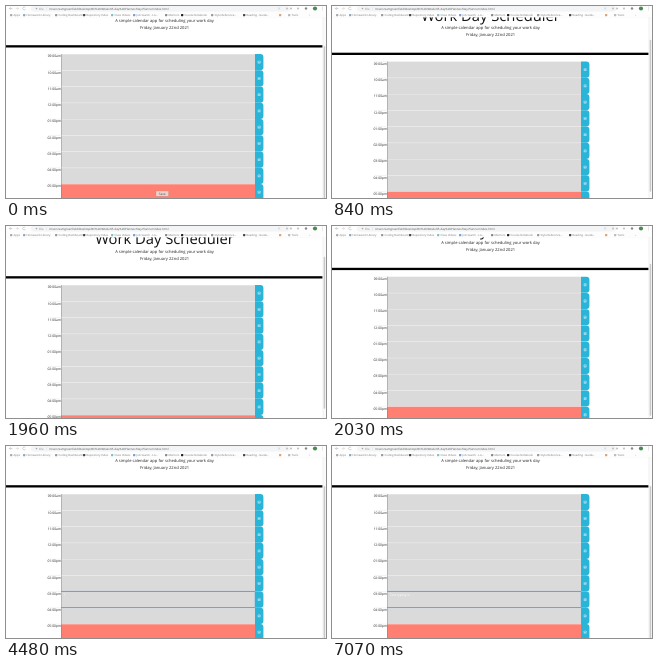
An HTML page for the animation above (8 s loop, 320x192 px).

```html
<!DOCTYPE html>
<html lang="en">
<head>
<meta charset="utf-8">
<title>Work Day Scheduler</title>
<style>
  html, body { margin: 0; width: 100%; height: 100%; overflow: hidden; background: #fff; }
  svg { display: block; width: 320px; height: 192px; }
  text { font-family: "Open Sans", Arial, sans-serif; text-rendering: geometricPrecision; white-space: pre; }
  .mid { text-anchor: middle; }
  .end { text-anchor: end; }
</style>
</head>
<body>
<svg id="stage" viewBox="0 0 320 192">
  <rect width="320" height="192" fill="#fff"/>
  <g id="page"></g>
  <rect x="316.8" y="11" width="3.2" height="181" fill="#fafafa"/>
  <rect x="316.8" y="11" width=".4" height="181" fill="#e2e2e2"/>
  <rect id="thumb" x="317.7" y="12" width="1.5" height="152" rx=".75" fill="#c8c8c8"/>
  <g id="chrome"></g>
</svg>
<script>
const LOOP = 8000;
const TOP = 81;        // top of the first row when not scrolled
const ROW = 16.25;
const HOURS = ["09:00am", "10:00am", "11:00am", "12:00pm", "01:00pm",
               "02:00pm", "03:00pm", "04:00pm", "05:00pm"];
const NOTE = "Test typing in";

// [time, value] steps; each value holds until the next
const SCROLL = [[0, 33], [420, 32.7], [490, 32], [560, 31], [630, 30], [700, 29], [770, 27.5],
  [840, 25.5], [910, 13], [980, 2], [1120, 1], [1260, 0],
  [1890, 7], [1960, 22], [2030, 30.4], [2100, 32], [2170, 32.6], [2310, 33]];
const TYPED = [[0, 0], [4480, 1], [4550, 2], [4620, 3], [5460, 6], [5670, 7],
  [5880, 9], [6090, 10], [6720, 12], [6790, 14]];
const FOCUS_AT = 2870;
const TIP_END = 140;

const byId = id => document.getElementById(id);
const page = byId("page"), chrome = byId("chrome"), thumb = byId("thumb");

function add(parent, tag, attrs, content) {
  const el = document.createElementNS("http://www.w3.org/2000/svg", tag);
  for (const key in attrs) el.setAttribute(key, attrs[key]);
  if (content !== undefined) el.textContent = content;
  parent.append(el);
  return el;
}
const rect = (g, x, y, width, height, fill, more) =>
  add(g, "rect", { x, y, width, height, fill, ...more });
const label = (g, x, y, size, content, fill = "#222", cls = "") =>
  add(g, "text", { x, y, "font-size": size, fill, class: cls }, content);
const path = (g, d, stroke, width = .6) =>
  add(g, "path", { d, stroke, "stroke-width": width, fill: "none" });
const dot = (g, cx, cy, r, fill) => add(g, "circle", { cx, cy, r, fill });

function drawHeader() {
  label(page, 158.5, 40.3, 14.76, "Work Day Scheduler", "#111", "mid");
  label(page, 158.5, 48.5, 4.1, "A simple calendar app for scheduling your work day", "#222", "mid");
  label(page, 158.5, 55.8, 4.1, "Friday, January 22nd 2021", "#222", "mid");
  rect(page, 0, 72.2, 316.6, 2.3, "#000");
}

function drawRow(hour, i) {
  const y = TOP + i * ROW;
  const present = i === HOURS.length - 1;
  rect(page, 55, y, 194, ROW + .1, present ? "#ff8072" : "#dadada");
  rect(page, 55, y, 194, .4, "#fff", { opacity: .6 });
  path(page, `M42 ${y + .2}H55`, "#aaa", .25).setAttribute("stroke-dasharray", ".6 .4");
  label(page, 55, y + 3.3, 3.3, hour, "#222", "end");
  rect(page, 55, y, .4, ROW, "#777");
  add(page, "path", {
    d: `M249 ${y + .1}h5.4q3 0 3 3v${ROW - 6.2}q0 3 -3 3h-5.4z`, fill: "#2ab4d8"
  });
  const cy = y + ROW / 2;
  rect(page, 251.7, cy - 1.4, 2.8, 2.8, "#a8dfef", { rx: .6 });
  rect(page, 252.3, cy - 1, 1.4, .7, "#2ab4d8");
  dot(page, 253.1, cy + .5, .4, "#2ab4d8");
}

function drawFocus() {
  const g = add(page, "g", {});
  const y = TOP + 6 * ROW;
  rect(g, 55.5, y - .4, 193, ROW + .2, "none", { stroke: "#9cc3e4", "stroke-width": .5 });
  for (const edge of [y - .5, y + ROW - .7]) rect(g, 55, edge, 194, 1, "#68a4d6");
  return g;
}

function drawTip() {
  const g = add(page, "g", {});
  rect(g, 150, 218, 12.5, 5.2, "#e9d2cd", { stroke: "#b98d86", "stroke-width": .3 });
  label(g, 156.2, 221.7, 3.2, "Save", "#555", "mid");
  return g;
}

function drawChrome() {
  rect(chrome, 0, 0, 320, 11.2, "#fdfdfd");
  rect(chrome, 25, 0, 259, 5.4, "#f3f4f5", { rx: 2.7 });
  path(chrome, "M6.4 2.5H3.4M4.7 1.2L3.4 2.5L4.7 3.8", "#aaa", .5);
  path(chrome, "M9.6 2.5H12.6M11.3 1.2L12.6 2.5L11.3 3.8", "#ccc", .5);
  path(chrome, "M19.2 1.6A1.4 1.4 0 1 0 19.4 3", "#aaa", .5);
  dot(chrome, 30.5, 2.6, .8, "#aaa");
  label(chrome, 33, 3.6, 2.9, "File", "#888");
  rect(chrome, 40.5, 1, .3, 3.3, "#ccc");
  label(chrome, 43, 3.6, 2.9,
    "/Users/samgreenfield/Desktop/BC%20/Week/05-day%20Planner/Day-Planner/index.html", "#555");
  path(chrome, "M272 1.4L274.3 3.6M274.3 1.4L272 3.6", "#bbb", .4);
  for (const x of [281, 285, 292]) dot(chrome, x, 2.5, 1.1, "#c4c4c4");
  dot(chrome, 300, 2.5, 1.2, "#8a8a8a");
  dot(chrome, 309, 2.5, 2.1, "#4b8a55");
  for (const y of [1.1, 2.5, 3.9]) dot(chrome, 316.5, y, .35, "#999");

  const marks = [
    [4, "#aaa", "Apps"], [17, "#8fa3c0", "Homework Library"], [49, "#999", "Coding Dashboard"],
    [77, "#444", "Repository Index"], [105, "#7fc0c4", "Class Videos"], [127, "#6fa0dc", "Job Search - Lis…"],
    [159, "#888", "Mentors"], [175, "#222", "Course Notebook"], [205, "#999", "Style Reference…"],
    [237, "#444", "Reading - Guide…"], [273, "#e0a070", ""], [282, "#bbb", "Tools"]
  ];
  for (const [x, color, name] of marks) {
    rect(chrome, x, 7.9, 2.3, 2.3, color, { rx: .6 });
    label(chrome, x + 3.6, 10, 2.75, name, "#777");
  }
  label(chrome, 303, 10, 2.7, "»", "#aaa");
  rect(chrome, 0, 11.2, 320, .25, "#eee");
}

drawHeader();
HOURS.forEach(drawRow);
const focus = drawFocus();
const tip = drawTip();
const note = label(page, 58, TOP + 6 * ROW + 4.4, 3.25, "", "#fff");
drawChrome();

function at(steps, t) {
  let value = steps[0][1];
  for (const [time, v] of steps) if (t >= time) value = v;
  return value;
}
const show = (el, on) => el.setAttribute("visibility", on ? "visible" : "hidden");

function draw() {
  const t = performance.now() % LOOP;
  const scroll = at(SCROLL, t);
  page.setAttribute("transform", `translate(0 ${-scroll})`);
  thumb.setAttribute("y", 12 + scroll * .85);
  show(focus, t >= FOCUS_AT);
  show(tip, t < TIP_END);
  note.textContent = NOTE.slice(0, at(TYPED, t));
  requestAnimationFrame(draw);
}
draw();
</script>
</body>
</html>
```
